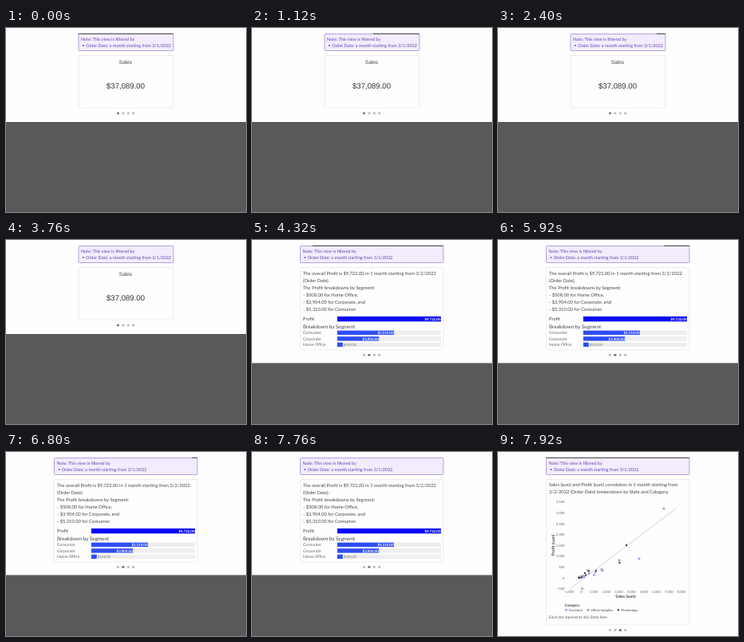
Write an HTML page that moves like this. It is 301 px wide and 231 px high and loops after 8 s.

```html
<!DOCTYPE html>
<html lang="en">
<head>
<meta charset="utf-8">
<title>Sales story</title>
<style>
html, body { margin: 0; width: 100%; height: 100%; overflow: hidden; background: #fefefe; }
svg { display: block; width: 301px; height: 231px; font-family: Lato, sans-serif; text-rendering: geometricPrecision; }
</style>
</head>
<body>
<svg id="stage" viewBox="0 0 301 231"></svg>
<script>
const LOOP = 8000, SLIDE = 3960, SHRINK = 3750;
const INK = '#444';

const rect = (x, y, w, h, fill, more = '') =>
  `<rect x="${x}" y="${y}" width="${w}" height="${h}" fill="${fill}" ${more}/>`;
const text = (x, y, size, str, fill = INK, more = '') =>
  `<text x="${x}" y="${y}" font-size="${size}" fill="${fill}" ${more}>${str}</text>`;
const dot = (x, y, r, fill, more = '') =>
  `<circle cx="${x}" cy="${y}" r="${r}" fill="${fill}" ${more}/>`;
const mid = 'text-anchor="middle"', end = 'text-anchor="end"', bold = 'font-weight="700"';

// Note, card, pager dots and the dark page bottom shared by all slides
function frame(left, right, cardEnd, pagerY, darkY, active) {
  const w = right - left, purple = '#6a3fb0';
  let s = rect(left + .5, 7.5, w - 1, 21, '#f2ecfc', 'stroke="#a88bd9" stroke-width=".8" rx="1"')
    + text(left + 3.5, 15.5, 5.45, 'Note: This view is filtered by', purple)
    + dot(left + 6.5, 22, .9, purple)
    + text(left + 9.7, 23.8, 5.45, 'Order Date: a month starting from 3/1/2022', purple)
    + rect(left + .5, 34.5, w - 1, cardEnd - 34.5, '#fefefe', 'stroke="#e9e9e9" stroke-width=".8" rx="1"');
  for (let i = 0; i < 4; i++)
    s += dot(140.5 + 6.4 * i, pagerY, 1.6, i === active ? '#777' : '#bbb');
  if (darkY < 231) s += rect(0, darkY, 301, 231 - darkY, '#595959');
  return s;
}

function total() {
  const sans = mid + ' font-family="Liberation Sans, Arial, sans-serif"';
  return frame(90.5, 210.5, 100, 107, 118, 0)
    + text(150, 44.5, 6.5, 'Sales', INK, sans)
    + text(150, 75.5, 9.6, '$37,089.00', '#333', sans);
}

function breakdown() {
  let s = frame(60, 240.5, 138, 144.3, 154.5, 1);
  ['The overall Profit is $9,722.00 in 1 month starting from 3/2/2022', '(Order Date).',
   'The Profit breakdowns by Segment:', '- $508.00 for Home Office,',
   '- $3,904.00 for Corporate, and', '- $5,310.00 for Consumer.']
    .forEach((line, i) => s += text(64, 43.8 + 9.1 * i, 5.8, line));
  s += text(64, 100.7, 5.8, 'Profit') + text(64, 110.5, 6.3, 'Breakdown by Segment');
  const bar = (y, h, value, fill) => {
    const w = 130 * value / 9722, label = '$' + value.toLocaleString('en-US') + '.00';
    s += rect(107, y, 130, h, '#eee') + rect(107, y, w, h, fill);
    s += value > 1000
      ? text(106.5 + w, y + h / 2 + 1.6, 4.45, label, '#fff', end + ' ' + bold)
      : text(108 + w, y + h / 2 + 1.6, 4.4, label, '#777');
  };
  bar(96, 6.3, 9722, '#0808f5');
  [['Consumer', 5310], ['Corporate', 3904], ['Home Office', 508]].forEach(([name, value], i) => {
    const y = 113.7 + 7.5 * i;
    s += text(64, y + 4.4, 5.1, name, '#666');
    bar(y, 5.4, value, '#2f4df2');
  });
  return s;
}

function scatter() {
  let s = frame(60, 240.5, 217, 223.7, 231, 2)
    + text(64, 43.3, 5.8, 'Sales (sum) and Profit (sum) correlation in 1 month starting from')
    + text(64, 52.4, 5.8, '3/2/2022 (Order Date) brokendown by State and Category.');
  const num = v => v.toLocaleString('en-US').replace('-', '−');
  for (let v = -500; v <= 3500; v += 500)
    s += text(83.5, 159.6 - v * .0272, 4.2, num(v), '#666', end);
  for (let v = -1000; v <= 8000; v += 1000)
    s += text(104.5 + v * .0157, 176.5, 4.2, num(v), '#666', mid);
  s += text(160, 182.5, 5.2, 'Sales (sum)', INK, mid + ' ' + bold)
    + text(0, 0, 5.2, 'Profit (sum)', INK, mid + ' ' + bold + ' transform="translate(70.5 117) rotate(-90)"')
    + '<path d="M90.5 171.5L223 71" stroke="#c9b8b8" stroke-width=".7"/>';

  const marks = [
    (x, y) => dot(x, y, 1.1, '#c9c4ff', 'stroke="#7b70f5" stroke-width=".7"'),
    (x, y) => dot(x, y, 1.1, '#ccc', 'stroke="#777" stroke-width=".7"'),
    (x, y) => dot(x, y, 1.1, '#111')
  ];
  [
    [[177, 134], [120.5, 154.5], [114, 152.5], [131, 149], [122, 151], [108, 157], [103, 158]],
    [[208, 71], [152, 136], [105.5, 171.5], [130, 147.5], [112.5, 148.5], [101, 157.5], [104, 156], [107, 155.5]],
    [[161, 117], [152.5, 139], [123, 149], [110, 154.5], [114, 149.5], [109, 152], [105, 157.5], [102, 158]]
  ].forEach((points, i) => points.forEach(p => s += marks[i](...p)));

  s += text(83.5, 193.5, 4.7, 'Category', INK, bold);
  [[85.5, 'Furniture'], [113, 'Office Supplies'], [151, 'Technology']].forEach(([x, name], i) =>
    s += marks[i](x, 198.3) + text(x + 3.5, 199.8, 4.2, name));
  return s + text(64, 209.3, 4.8, 'Each dot represents a(n) State item', '#555');
}

// cubic-bezier(.25, .1, .25, 1)
function ease(x) {
  if (x >= 1) return 1;
  const curve = (a, b, u) => 3 * a * u * (1 - u) ** 2 + 3 * b * u * u * (1 - u) + u ** 3;
  let lo = 0, hi = 1;
  for (let i = 0; i < 24; i++) {
    const u = (lo + hi) / 2;
    if (curve(.25, .25, u) < x) lo = u; else hi = u;
  }
  return curve(.1, 1, lo);
}

const stage = document.getElementById('stage');
stage.innerHTML = [total, breakdown, scatter].map(f => `<g>${f()}</g>`).join('')
  + rect(0, 6.7, 0, 1.3, '#5c5c68');
const slides = stage.querySelectorAll('g'), timer = stage.lastElementChild;
const spans = [[90.5, 210], [60, 240], [60, 240]];
const start = performance.now();

function draw(now) {
  const t = Math.max(0, now - start) % LOOP;
  const current = Math.floor(t / SLIDE), [left, right] = spans[current];
  slides.forEach((g, i) => g.style.display = i === current ? '' : 'none');
  const width = (right - left) * (1 - ease((t % SLIDE) / SHRINK));
  timer.setAttribute('x', right - width);
  timer.setAttribute('width', width);
  requestAnimationFrame(draw);
}
draw(start);
</script>
</body>
</html>
```
